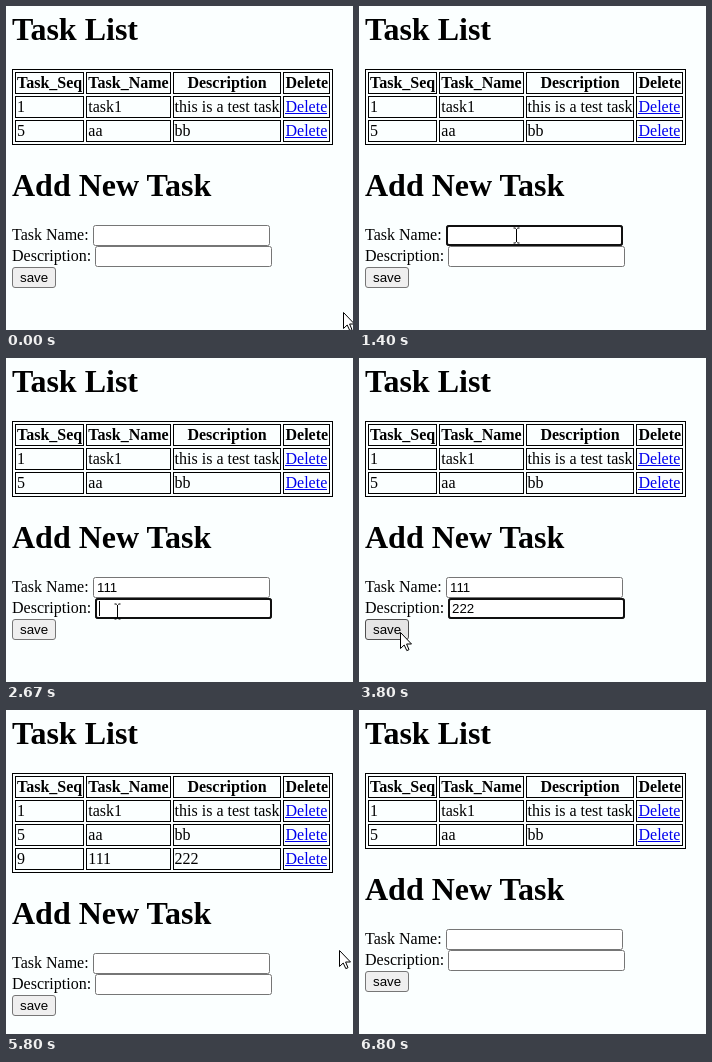
Write an HTML page that moves like this. It is 347 px wide and 324 px high and loops after 7.54 s.

```html
<!DOCTYPE html>
<html lang="en">
<head>
<meta charset="utf-8">
<title>Task List</title>
<style>
html, body { margin: 0; width: 100%; height: 100%; overflow: hidden; background: #fbffff; }
svg { display: block; width: 347px; height: 324px; }
text { font: 16px "Liberation Serif", "Times New Roman", serif; white-space: pre; }
.h1 { font-size: 32px; font-weight: bold; }
.th { font-weight: bold; }
.ui { font: 13.333px "Liberation Sans", Arial, sans-serif; }
.line { fill: none; stroke: #000; }
</style>
</head>
<body>
<svg id="stage" viewBox="0 0 347 324" xmlns="http://www.w3.org/2000/svg"></svg>
<script>
const LOOP = 7540, FPS = 15;
const stage = document.getElementById('stage');
const $ = id => document.getElementById(id);

// Table geometry: [cell left, cell right, text x]
const cols = [[9, 78, 11], [80, 165, 82.3], [167, 275, 168.6], [277, 324, 279.5]];
const rows = [
  ['Task_Seq', 'Task_Name', 'Description', 'Delete'],
  ['1', 'task1', 'this is a test task', 'Delete'],
  ['5', 'aa', 'bb', 'Delete'],
  ['9', '111', '222', 'Delete']
];
const fields = [
  { x: 87, y: 219, label: 'Task Name:' },
  { x: 89, y: 240, label: 'Description:' }
];
const W = 177, H = 21;

const text = (x, y, s, attrs = '') => `<text x="${x}" y="${y}" ${attrs}>${s}</text>`;
const box = (x, y, w, h, attrs) =>
  `<rect x="${x + .5}" y="${y + .5}" width="${w - 1}" height="${h - 1}" ${attrs}/>`;

function cell(s, r, c) {
  const [left, right, tx] = cols[c], top = 66 + r * 24, base = top + 16;
  const frame = box(left, top, right - left, 22, 'class="line"');
  if (!r) {
    return frame + (c === 2 ? text(221, base, s, 'class="th" text-anchor="middle"')
                            : text(tx, base, s, 'class="th"'));
  }
  if (c < 3) return frame + text(tx, base, s);
  return frame + `<g id="link${r}" fill="#0000ee">${text(tx, base, s)}` +
    `<rect x="279" y="${base + 1}" width="42" height="1"/></g>`;
}

const field = (f, i) => text(6, f.y + 15, f.label) +
  box(f.x, f.y, W, H, `id="edge${i}" fill="#fff" rx="2"`) +
  `<rect id="ring${i}" x="${f.x + 1}" y="${f.y + 1}" width="${W - 2}" height="${H - 2}" rx="2" fill="none" stroke="#101010" stroke-width="2"/>` +
  text(f.x + 4, f.y + 15, '', `id="val${i}" class="ui"`) +
  `<rect id="caret${i}" y="${f.y + 3}" width="1" height="15"/>`;

stage.innerHTML =
  '<rect width="347" height="324" fill="#fbffff"/>' +
  text(6, 34, 'Task List', 'class="h1"') +
  box(6, 63, 321, 76, 'id="table" class="line"') +
  rows.map((row, r) => `<g id="row${r}">${row.map((s, c) => cell(s, r, c)).join('')}</g>`).join('') +
  '<g id="form">' + text(6, 190, 'Add New Task', 'class="h1"') + fields.map(field).join('') +
  box(6, 261, 44, H, 'id="button" rx="2.5"') + text(14, 276, 'save', 'class="ui"') + '</g>' +
  '<g id="pointer">' +
  '<path id="arrow" d="M.5 .5V16.5L4.2 13 6.8 18.6 9 17.7 6.6 12H11.5Z" fill="#fff" stroke="#000"/>' +
  '<path id="beam" d="M-3 -7.5H-1M1 -7.5H3M-3 7.5H-1M1 7.5H3M-1 -7L0 -6 1 -7M-1 7L0 6 1 7M0 -6.5V6.5" fill="none" stroke="#000"/>' +
  '<path id="hand" d="M-1.5 13V2Q-1.5 .5 0 .5T1.5 2V8Q1.5 6 3 6T4.5 8Q4.5 6.5 6 6.5T7.5 8.5Q7.5 7.5 9 7.5T10.5 9.5V15L8.5 18.5V21.5H-.5V18.5L-5 12.5Q-5.5 10.5 -3.7 10.5Z" fill="#fff" stroke="#000"/>' +
  '</g>';

// Pointer strokes: lists of [step, x, y]; hidden between strokes
const strokes = [
  [[0, 337, 306], [1, 335, 304], [4, 290, 283], [8, 195, 243], [11, 157, 229], [34, 157, 229],
   [36, 132, 241], [38, 111, 253], [45, 111, 253], [47, 76, 261], [49, 41, 274], [61, 41, 274],
   [63, 46, 277], [64, 60, 283], [66, 140, 318], [67, 190, 340]],
  [[71, 313, 320], [72, 324, 317], [73, 335, 320], [74, 345, 340]],
  [[87, 333, 240], [89, 312, 188], [91, 295, 158], [92, 291, 153], [97, 291, 153],
   [99, 312, 195], [101, 341, 291], [102, 360, 340]]
];

function pointerAt(n) {
  const path = strokes.find(p => n >= p[0][0] && n < p[p.length - 1][0]);
  if (!path) return null;
  const i = path.findIndex(p => p[0] > n);
  const [a, ax, ay] = path[i - 1], [b, bx, by] = path[i], k = (n - a) / (b - a);
  return [Math.round(ax + (bx - ax) * k), Math.round(ay + (by - ay) * k)];
}

const within = (p, x, y, w, h) => p && p[0] >= x && p[0] < x + w && p[1] >= y && p[1] < y + h;
const show = (id, on) => $(id).setAttribute('display', on ? 'inline' : 'none');
const typed = (n, ch, keys) => ch.repeat(keys.filter(k => n >= k).length);

function draw(n) {
  const added = n >= 61 && n < 97, dy = added ? 24 : 0;
  const p = pointerAt(n);
  const focus = n >= 13 && n < 40 ? 0 : n >= 40 && n < 59 ? 1 : -1;
  const caretOn = n < 21 || (n >= 29 && n < 57);
  const values = n < 61 ? [typed(n, '1', [32, 33, 34]), typed(n, '2', [44, 46, 48])] : ['', ''];

  show('row3', added);
  $('table').setAttribute('height', 75 + dy);
  $('form').setAttribute('transform', `translate(0 ${dy})`);
  $('link3').setAttribute('fill', n === 94 ? '#ff0000' : '#0000ee');

  let overText = within(p, 6, 219 + dy, 81, 42);
  fields.forEach((f, i) => {
    const hover = within(p, f.x, f.y + dy, W, H);
    overText = overText || hover;
    $('edge' + i).setAttribute('stroke', hover ? '#4f4f4f' : '#767676');
    show('ring' + i, focus === i);
    $('val' + i).textContent = values[i];
    show('caret' + i, focus === i && caretOn);
    $('caret' + i).setAttribute('x', f.x + 4 + Math.floor(values[i].length * 7.415));
  });

  const onButton = within(p, 6, 261 + dy, 44, H), pressed = n === 59 || n === 60;
  $('button').setAttribute('fill', pressed ? '#f5f5f5' : onButton ? '#e5e5e5' : '#efefef');
  $('button').setAttribute('stroke', pressed ? '#8d8d8d' : onButton ? '#4f4f4f' : '#767676');

  show('pointer', p);
  if (!p) return;
  const onLink = added && within(p, 279, 141, 42, 18);
  show('hand', onLink);
  show('beam', overText && !onLink);
  show('arrow', !overText && !onLink);
  const half = overText ? .5 : 0;
  $('pointer').setAttribute('transform', `translate(${p[0] + half} ${p[1] + half})`);
}

let start = null, last = -1;
function tick(now) {
  if (start === null) start = now;
  const n = Math.floor(((now - start) % LOOP + 4) * FPS / 1000);
  if (n !== last) draw(last = n);
  requestAnimationFrame(tick);
}
draw(0);
requestAnimationFrame(tick);
</script>
</body>
</html>
```
